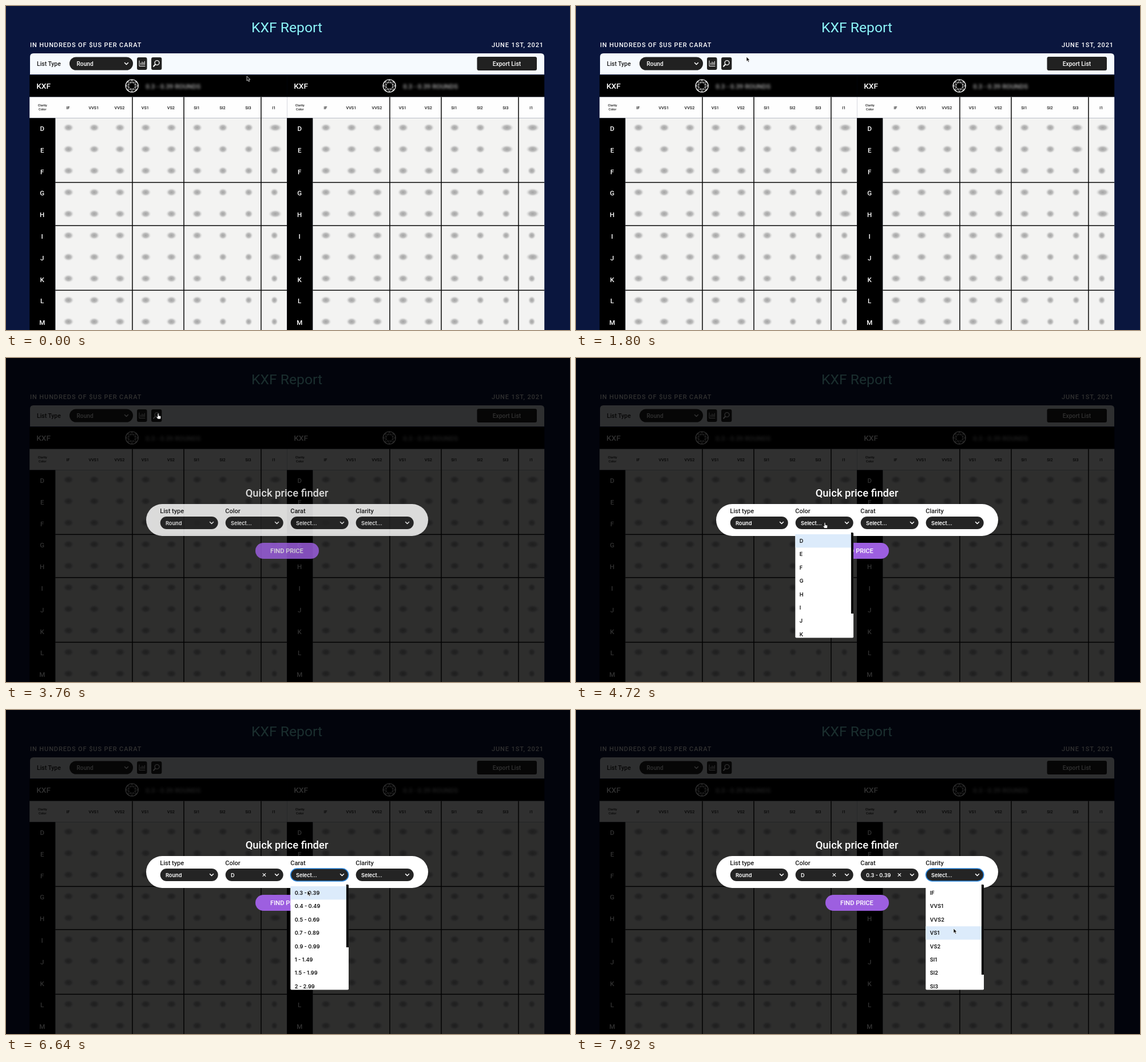
Recreate the animation shown at these times as an HTML page. Size 986 by 568 pixels, loop 8000 ms.

```html
<!DOCTYPE html>
<html lang="en">
<head>
<meta charset="utf-8">
<title>Price report</title>
<style>
  html, body { margin: 0; width: 100%; height: 100%; overflow: hidden; background: #0a163e; }
  svg { display: block; width: 986px; height: 568px; font-family: Roboto, sans-serif; }
  .ui { font: 600 9.2px Inter, sans-serif; }
  .line { fill: none; stroke: #fff; stroke-linecap: round; stroke-linejoin: round; }
</style>
</head>
<body>
<svg id="stage" viewBox="0 0 986 568" xmlns="http://www.w3.org/2000/svg">
  <defs>
    <radialGradient id="smudge">
      <stop offset="0" stop-color="#a2a2a2"/>
      <stop offset=".5" stop-color="#b2b2b2" stop-opacity=".85"/>
      <stop offset="1" stop-color="#ddd" stop-opacity="0"/>
    </radialGradient>
    <filter id="blur" x="-10%" y="-60%" width="120%" height="220%"><feGaussianBlur stdDeviation="2"/></filter>
    <clipPath id="menuClip"><rect width="102" height="184.5" rx="2"/></clipPath>
  </defs>
</svg>
<script>
const NS = 'http://www.w3.org/2000/svg';
const LOOP = 8000;
const stage = document.getElementById('stage');
const CLARITY = ['IF', 'VVS1', 'VVS2', 'VS1', 'VS2', 'SI1', 'SI2', 'SI3', 'I1'];
const COLORS = [...'DEFGHIJKLM'];
const ROW = 37.8, TOP = 196, OPTION = 23.4;

function el(parent, tag, attrs = {}, text) {
  const node = document.createElementNS(NS, tag);
  for (const key in attrs) node.setAttribute(key, attrs[key]);
  if (text !== undefined) node.textContent = text;
  return parent.appendChild(node);
}
const group = (parent, x = 0, y = 0) => el(parent, 'g', { transform: `translate(${x} ${y})` });
const rect = (parent, x, y, width, height, fill, rx = 0) =>
  el(parent, 'rect', { x, y, width, height, fill, rx });
const line = (parent, d, width = 1.3) => el(parent, 'path', { d, class: 'line', 'stroke-width': width });
const label = (parent, x, y, size, text, attrs = {}) =>
  el(parent, 'text', { x, y, 'font-size': size, 'font-weight': 500, fill: '#fff', ...attrs }, text);
const chevron = (parent, x, y) => line(parent, `M${x - 3} ${y - 1.5}l3 3 3-3`, 1.5);
const show = (node, on) => node.setAttribute('visibility', on ? 'visible' : 'hidden');
const mid = { 'text-anchor': 'middle' };
const dark = { fill: '#1b1b1b' };

function diamond(parent, x, y) {
  const g = group(parent, x, y);
  const at = (r, i) => {
    const a = i * Math.PI / 8;
    return `${(r * Math.cos(a)).toFixed(2)} ${(r * Math.sin(a)).toFixed(2)}`;
  };
  el(g, 'circle', { r: 11, class: 'line', 'stroke-width': 1.2 });
  let d = '';
  for (let i = 1; i < 16; i += 2) {
    d += `M${at(6, i)}L${at(6, i + 2)}M${at(11, i - 1)}L${at(6, i)}L${at(11, i + 1)}`;
  }
  line(g, d, .7);
}

function table(x, second) {
  const g = group(stage, x);
  rect(g, 0, 121, 450, 38.5, '#000');
  label(g, 12, 145, 13.7, 'KXF');
  diamond(g, 179, 140);
  label(g, 203, 144.5, 11.4, '0.3 - 0.39 ROUNDS', { fill: '#aaa', filter: 'url(#blur)' });
  rect(g, 0, 159.5, 450, 37, '#fefefe');
  rect(g, 45, 196.5, 405, 372, '#f3f3f2');
  rect(g, 0, 196.5, 45, 372, '#000');
  label(g, 22.5, 176, 5.6, 'Clarity', { ...mid, ...dark });
  label(g, 22.5, 183, 5.6, 'Color', { ...mid, ...dark });
  CLARITY.forEach((name, c) => label(g, 67.2 + c * 45, 180.5, 7.2, name, { ...mid, ...dark }));
  COLORS.forEach((name, r) => {
    label(g, 22, TOP + r * ROW + 23, 11.5, name, mid);
    CLARITY.forEach((_, c) => {
      const wide = c === 8 && 'DEHJ'.includes(name) || second && c === 8 && name === 'G'
        || second && c === 7 && r < 2;
      const rx = wide ? 12 : 9.6 - Math.max(0, c - 4) * .35 - (c > 5 ? r * .2 : 0);
      el(g, 'ellipse', { cx: 68 + c * 45 + (wide ? 1.5 : 0), cy: 213.2 + r * ROW, rx, ry: 7.2, fill: 'url(#smudge)' });
    });
  });
  for (const c of [3, 5, 8]) rect(g, 44 + c * 45, 159.5, 1.5, 409, '#050505');
  for (const r of [3, 5, 8]) rect(g, 45, TOP - .8 + r * ROW, 405, 1.5, '#050505');
}

// Report page
rect(stage, 0, 0, 986, 568, '#0a163e');
label(stage, 491, 46, 24.7, 'KXF Report', { ...mid, fill: '#8cf4f7', 'font-weight': 400 });
label(stage, 42, 72.3, 11, 'IN HUNDREDS OF $US PER CARAT', { 'letter-spacing': .9 });
label(stage, 849, 72.3, 11, 'JUNE 1ST, 2021', { 'letter-spacing': .9 });
el(stage, 'path', { d: 'M42 120V89q0-6 6-6H935q6 0 6 6V120Z', fill: '#f6fafe' });
label(stage, 54, 104.7, 10.4, 'List Type', dark);
rect(stage, 111, 89.5, 111, 23, '#212121', 11.5);
label(stage, 123.5, 104.7, 10.2, 'Round');
chevron(stage, 210.5, 101);
rect(stage, 229, 90, 17.5, 22, '#212121', 3);
line(stage, 'M233 96v9.5h10M235.7 103v-3M238 103v-5M240.2 103v-4M242.3 103v-6', 1);
const findIcon = rect(stage, 254, 90, 18.3, 22, '#212121', 3);
el(stage, 'circle', { cx: 264, cy: 99.5, r: 3.9, class: 'line', 'stroke-width': 1.4 });
line(stage, 'M261 102.5l-3 3.2', 2);
rect(stage, 823.5, 89, 104.5, 24, '#212121', 3);
label(stage, 875.5, 104.7, 10.3, 'Export List', mid);
table(41.2, false);
table(491.2, true);
const shade = rect(stage, 0, 0, 986, 568, '#000');

// Price finder
const modal = group(stage);
label(modal, 491, 243, 18.4, 'Quick price finder', mid);
rect(modal, 245, 256, 493, 56, '#fff', 28);
rect(modal, 436, 324, 111, 28, '#9d5fe0', 14);
label(modal, 491, 342, 11.1, 'FIND PRICE', mid);

const FIELDS = [
  { name: 'List type', value: 'Round' },
  { name: 'Color', pick: 'D', open: 4640, close: 5400, bar: 142, items: COLORS.slice(0, 8) },
  { name: 'Carat', pick: '0.3 - 0.39', open: 6080, close: 6760, bar: 110,
    items: ['0.3 - 0.39', '0.4 - 0.49', '0.5 - 0.69', '0.7 - 0.89', '0.9 - 0.99', '1 - 1.49', '1.5 - 1.99', '2 - 2.99'] },
  { name: 'Clarity', open: 7320, close: LOOP + 1, bar: 158, items: CLARITY.slice(0, 8) },
];

FIELDS.forEach((f, i) => {
  const g = group(modal, 269.2 + i * 114, 0);
  label(g, 0, 272, 11, f.name, dark);
  f.box = rect(g, .5, 278, 101, 22, '#242424', 11);
  f.text = el(g, 'text', { x: 9.8, y: 292.5, fill: '#fff', class: 'ui' }, f.value || 'Select...');
  chevron(g, 90.3, 289);
  if (!f.items) return;
  f.clear = line(g, 'M65.8 286.6l4.8 4.8m0-4.8l-4.8 4.8', 1.1);
  f.menu = el(group(modal, 269.2 + i * 114, 306), 'g', { 'clip-path': 'url(#menuClip)' });
  rect(f.menu, 0, 0, 102, 185, '#fff');
  f.mark = rect(f.menu, 0, 3, 98, OPTION, '#dcebfb');
  rect(f.menu, 97.7, 0, 4.3, f.bar, '#0b0b0b');
  f.items.forEach((item, k) =>
    el(f.menu, 'text', { x: 7.6, y: 18 + k * OPTION, fill: '#111', class: 'ui' }, item));
});

// Pointer
const pointer = group(stage);
const arrow = el(pointer, 'path', {
  d: 'M0 0V8.2L1.9 6.5 3.3 9.5 4.8 8.8 3.4 5.9H6Z', fill: '#111', stroke: '#fff', 'stroke-width': .7 });
const hand = el(pointer, 'path', {
  d: 'M-1 1a1 1 0 0 1 2 0V4l2.6.6q1.4.3 1.2 1.8L4.3 10H-.6L-3.2 6.5q.4-1.3 2.2 0Z',
  fill: '#fff', stroke: '#111', 'stroke-width': .7 });

const PATH = [
  [0, 421, 123], [200, 421, 123], [1700, 298, 89], [1850, 298, 89], [2900, 266, 97], [4000, 266, 97],
  [4600, 435, 288.5], [4900, 435, 288.5], [5250, 425, 318], [5450, 425, 318], [6000, 541, 289],
  [6160, 541, 289], [6500, 527, 317], [6780, 527, 317], [7240, 658, 289], [7400, 658, 289],
  [7840, 660, 383], [LOOP, 660, 383],
];
const clamp = v => Math.max(0, Math.min(1, v));
const ramp = (t, a, b) => clamp((t - a) / (b - a));
const ease = u => u * u * (3 - 2 * u);

function pointerAt(t) {
  const i = Math.max(1, PATH.findIndex(p => p[0] > t));
  const [t0, x0, y0] = PATH[i - 1], [t1, x1, y1] = PATH[i];
  const u = ease(ramp(t, t0, t1));
  return [x0 + (x1 - x0) * u, y0 + (y1 - y0) * u];
}

function draw(t) {
  const [x, y] = pointerAt(t);
  const shaded = ramp(t, 3480, 3740);
  shade.setAttribute('opacity', .81 * shaded);
  modal.setAttribute('opacity', ramp(t, 3480, 3820));
  const onIcon = x > 254 && x < 272.3 && y > 90 && y < 112;
  findIcon.setAttribute('fill', onIcon && !shaded ? '#565656' : '#212121');

  FIELDS.forEach(f => {
    if (!f.items) return;
    const open = t >= f.open && t < f.close;
    const picked = t >= f.close;
    const focused = t >= f.open + 100 && open;
    show(f.menu, open);
    show(f.clear, picked);
    f.text.textContent = picked ? f.pick : 'Select...';
    f.box.setAttribute('stroke', focused ? '#2b86dd' : 'none');
    f.box.setAttribute('stroke-width', 1.6);
    const row = Math.max(0, Math.min(7, Math.floor((y - 309) / OPTION)));
    f.mark.setAttribute('y', 3 + row * OPTION);
  });

  const onField = t > 4000 && x > 383 && x < 713 && y > 278 && y < 300;
  const pointing = onIcon || onField;
  show(hand, pointing);
  show(arrow, !pointing);
  pointer.setAttribute('transform', `translate(${x.toFixed(2)} ${y.toFixed(2)})`);
}

const start = performance.now();
function tick() {
  draw((performance.now() - start) % LOOP);
  requestAnimationFrame(tick);
}
draw(0);
requestAnimationFrame(tick);
</script>
</body>
</html>
```
